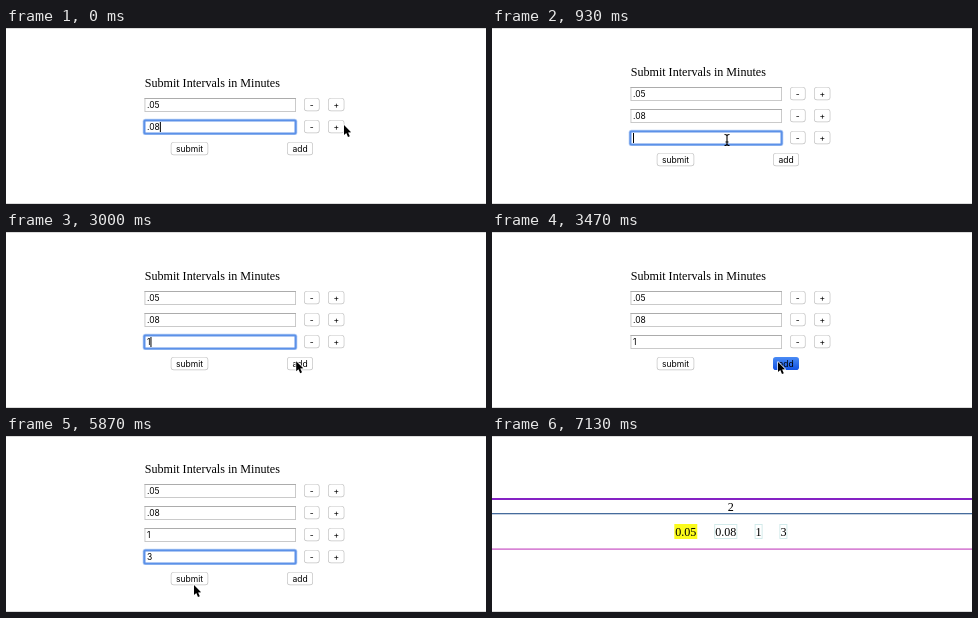
Animation, 480 px wide and 176 px high, one loop 8 s. Source, as an HTML page with a canvas:

```html
<!DOCTYPE html>
<html lang="en">
<head>
<meta charset="utf-8">
<title>Submit Intervals</title>
<style>
html, body { margin: 0; width: 100%; height: 100%; overflow: hidden; background: #fff; }
canvas { display: block; width: 480px; height: 176px; }
</style>
</head>
<body>
<canvas id="stage"></canvas>
<script>
const W = 480, H = 176, LOOP = 8000, STEP = 1000 / 15;
const SERIF = '12.08px "Liberation Serif", Times, serif';
const SANS = '8.5px Inter, "Liberation Sans", sans-serif';
const canvas = document.getElementById('stage');
const dpr = window.devicePixelRatio || 1;
canvas.width = W * dpr;
canvas.height = H * dpr;
const ctx = canvas.getContext('2d');

// Pointer path: time, x, y
const path = [
  [0, 338, 97], [400, 338, 97], [870, 235, 112], [2000, 235, 112],
  [2400, 327, 107], [2470, 327, 107], [2870, 291, 129], [3400, 286, 130],
  [3730, 286, 130], [4130, 209, 120], [5470, 209, 120], [5870, 188, 149],
  [6000, 187, 146], [6330, 187, 146], [6730, 298, 178]
];

const within = (t, a, b) => t >= a && t < b;

function pointerAt(t) {
  const i = path.findIndex(p => p[0] > t);
  if (i < 0) return path[path.length - 1].slice(1);
  const [t0, x0, y0] = path[i - 1], [t1, x1, y1] = path[i];
  const u = (t - t0) / (t1 - t0), e = u * u * (3 - 2 * u);
  return [x0 + (x1 - x0) * e, y0 + (y1 - y0) * e];
}

function text(str, x, y, font, align = 'left') {
  ctx.font = font;
  ctx.textAlign = align;
  ctx.fillStyle = '#000';
  ctx.fillText(str, x, y);
}

function rect(x, y, w, h, color) {
  ctx.fillStyle = color;
  ctx.fillRect(x, y, w, h);
}

function round(x, y, w, h, r, color) {
  ctx.fillStyle = color;
  ctx.beginPath();
  ctx.roundRect(x, y, w, h, r);
  ctx.fill();
}

function button(label, cx, cy, w, pressed) {
  const x = cx - w / 2, y = cy - 6.5;
  if (pressed) {
    const g = ctx.createLinearGradient(0, y, 0, y + 13);
    g.addColorStop(0, '#4a8bf5');
    g.addColorStop(1, '#1352e2');
    round(x, y, w, 13, 2.8, g);
  } else {
    round(x, y, w, 13.3, 3, '#c3c3c3');
    round(x + 0.7, y + 0.6, w - 1.4, 11.8, 2.5, '#fff');
  }
  text(label, cx, cy + 3, SANS, 'center');
}

function field(value, cy, focused, caret) {
  if (focused) {
    round(136.7, cy - 8.3, 154.6, 16.4, 2.6, '#b4cdf5');
    round(137.4, cy - 7.6, 153.2, 15, 2, '#5c91e8');
    rect(139.5, cy - 5.5, 149, 11, '#fff');
  } else {
    rect(138.5, cy - 7, 151.5, 14, '#c4c4c4');
    rect(139.4, cy - 6, 149.7, 12.1, '#fff');
    rect(138.5, cy - 7, 151.5, 1, '#acacac');
  }
  text(value, 141, cy + 3.3, SANS);
  if (caret) rect(141 + ctx.measureText(value).width, cy - 5, 1, 10, '#000');
}

function arrow(x, y) {
  ctx.save();
  ctx.translate(x, y);
  ctx.beginPath();
  [[0, 0], [0, 10], [2.3, 8], [4, 12], [5.8, 11.2], [4.1, 7.4], [7.1, 7.2]]
    .forEach(p => ctx.lineTo(...p));
  ctx.closePath();
  ctx.lineJoin = 'round';
  ctx.lineWidth = 1.4;
  ctx.strokeStyle = '#fff';
  ctx.stroke();
  ctx.fillStyle = '#000';
  ctx.fill();
  ctx.restore();
}

function beam(x, y) {
  ctx.beginPath();
  ctx.moveTo(x - 2.5, y - 5.5);
  ctx.quadraticCurveTo(x, y - 5.5, x, y - 4);
  ctx.lineTo(x, y + 4);
  ctx.quadraticCurveTo(x, y + 5.5, x - 2.5, y + 5.5);
  ctx.moveTo(x + 2.5, y - 5.5);
  ctx.quadraticCurveTo(x, y - 5.5, x, y - 4);
  ctx.moveTo(x, y + 4);
  ctx.quadraticCurveTo(x, y + 5.5, x + 2.5, y + 5.5);
  ctx.moveTo(x - 1.5, y + 2);
  ctx.lineTo(x + 1.5, y + 2);
  ctx.strokeStyle = '#000';
  ctx.lineWidth = 1.1;
  ctx.stroke();
}

function form(t) {
  const values = ['.05', '.08'];
  if (t >= 200) values.push(t >= 1530 ? '1' : '');
  if (t >= 3600) values.push(t >= 5070 ? '3' : '');
  const n = values.length;
  const top = 99 - 11 * n;
  const focused = t < 70 || within(t, 930, 3470) || within(t, 4200, 6000);
  const caret = t < 70 || within(t, 930, 1400) || within(t, 1530, 2070) ||
    within(t, 2600, 3130) || within(t, 4200, 4670) || within(t, 5070, 5600);

  text('Submit Intervals in Minutes', 138.7, top - 17.6, SERIF);
  values.forEach((value, i) => {
    const y = top + 22 * i, last = i === n - 1;
    field(value, y, last && focused, last && caret);
    button('-', 305.8, y - 0.5, 15.6);
    button('+', 330.2, y - 0.5, 16.4, last && within(t, 70, 200));
  });
  const y = top + 22 * n - 0.5;
  button('submit', 183.5, y, 37.5, within(t, 6000, 6130));
  button('add', 294, y, 26, within(t, 3470, 3600));
  return values.map((_, i) => top + 22 * i);
}

function timer(t) {
  rect(0, 62, W, 2, '#8522c4');
  rect(0, 77, W, 1.3, '#466c9c');
  rect(0, 112.5, W, 1.2, '#c750c4');
  text(t < 7130 ? '3' : '2', 238.8, 74.6, SERIF, 'center');
  [['0.05', 193.8], ['0.08', 233.8], ['1', 266.6], ['3', 291.4]].forEach(([label, cx], i) => {
    ctx.font = SERIF;
    const w = ctx.measureText(label).width + 1;
    if (i === 0) rect(cx - w / 2 - 0.4, 88, w + 0.8, 15, '#fbfb1c');
    else {
      ctx.strokeStyle = '#cfe9e9';
      ctx.lineWidth = 0.9;
      ctx.strokeRect(cx - w / 2, 88.5, w, 14);
    }
    text(label, cx, 99.8, SERIF, 'center');
  });
}

function draw(now) {
  // The screen updates fifteen times a second.
  const t = Math.floor(((now % LOOP) + 4) / STEP) * STEP + 4;
  ctx.setTransform(dpr, 0, 0, dpr, 0, 0);
  rect(0, 0, W, H, '#fff');
  rect(0, 0, W, 1, '#dcdcdc');
  rect(0, 175, W, 1, '#dcdcdc');

  let rows = [];
  if (t < 6130) rows = form(t);
  else timer(t);

  const hidden = within(t, 1530, 2070) || within(t, 5070, 5530) || t >= 6730;
  if (!hidden) {
    const [x, y] = pointerAt(t);
    const overField = x > 139 && x < 290 && rows.some(r => Math.abs(y - r) < 7);
    (overField ? beam : arrow)(x, y);
  }
}

const start = performance.now();
function loop() {
  draw(performance.now() - start);
  requestAnimationFrame(loop);
}
loop();
</script>
</body>
</html>
```
